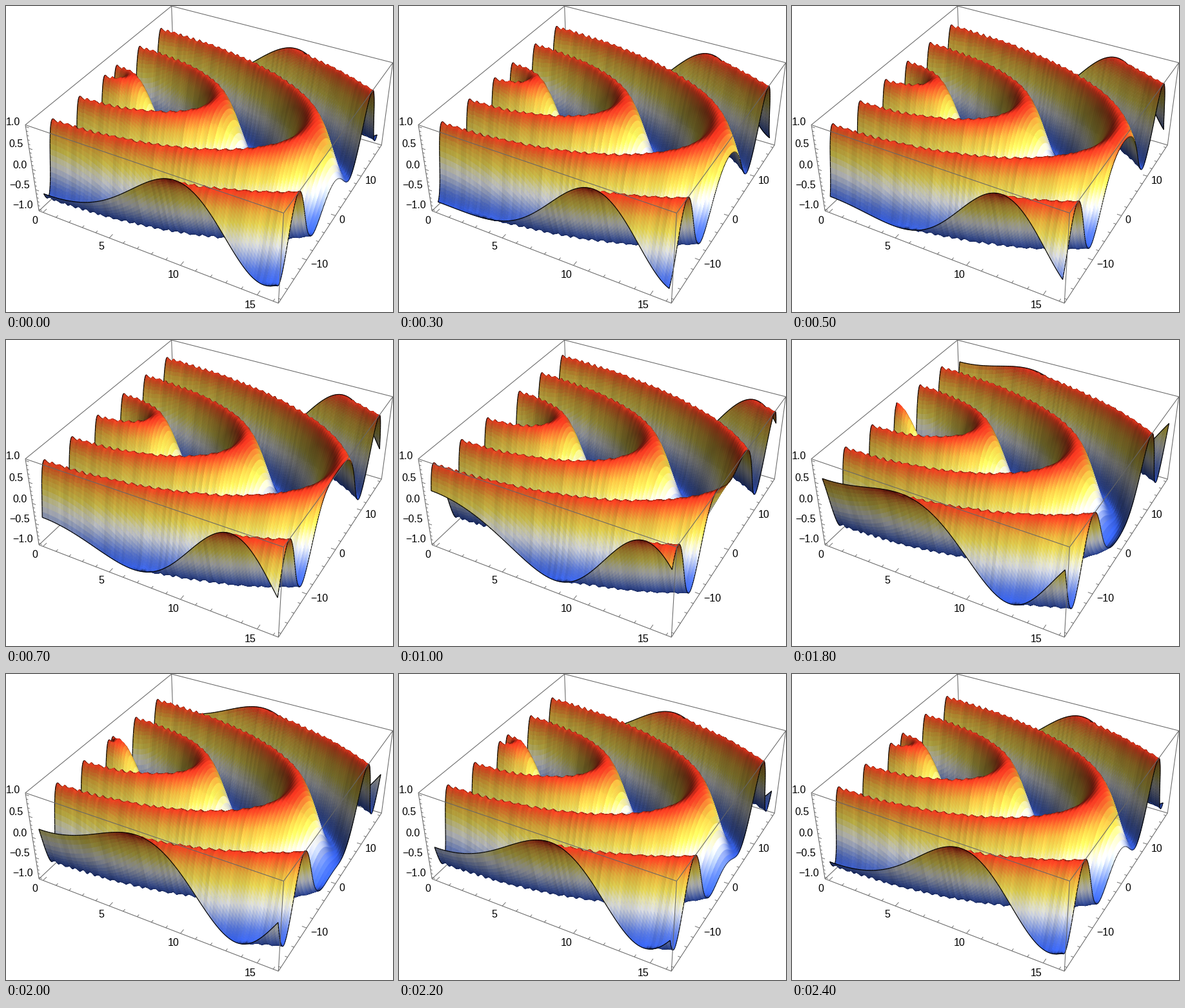
These frames come from a looping animation (600 px wide and 475 px high, 2500 ms). A matplotlib script:

```python
import numpy as np
import matplotlib.pyplot as plt
from matplotlib.animation import FuncAnimation
from matplotlib.collections import LineCollection, PolyCollection
from matplotlib.colors import LinearSegmentedColormap

W, H, DPI = 600, 475, 100
FRAMES, STEPS = 25, 24
NX, NY = 90, 240
X_MAX, Y_MAX = 16, 18
PAD = 1.04                       # axis box is slightly larger than the data
HALF = 0.5 / PAD
KX, KY = X_MAX * PAD, 2 * Y_MAX * PAD
AMP = 0.163
LIGHT = np.array([0.72, -0.32, 0.62])
GREY = "#666666"

# Camera looking at the centre of a 1 x 1 x 0.4 box
EYE = np.array([1.3, -2.4, 2.0])
DIST = np.linalg.norm(EYE)
FWD = -EYE / DIST
RIGHT = np.cross(FWD, [0, 0, 1])
RIGHT /= np.linalg.norm(RIGHT)
UP = np.cross(RIGHT, FWD)
ZOOM, CX, CY, SHEAR = 1369, 329.0, 201.5, 0.0055

HEAT = LinearSegmentedColormap.from_list("heat", [
    (0.00, (0.20, 0.38, 0.96)),
    (0.14, (0.38, 0.52, 0.96)),
    (0.30, (0.74, 0.80, 0.97)),
    (0.40, (0.95, 0.96, 0.98)),
    (0.50, (1.00, 0.99, 0.80)),
    (0.64, (1.00, 0.93, 0.36)),
    (0.78, (0.99, 0.76, 0.26)),
    (0.90, (0.99, 0.46, 0.18)),
    (0.96, (1.00, 0.27, 0.14)),
    (1.00, (1.00, 0.20, 0.12)),
])


def project(p):
    """Box coordinates (..., 3) to stage pixels (..., 2)."""
    p = np.asarray(p, float)
    depth = DIST + p @ FWD
    u, v = p @ RIGHT / depth, p @ UP / depth
    return np.stack([CX + ZOOM * u, CY - ZOOM * (v + SHEAR * u)], -1)


def segment(a, b):
    """Flat quads that draw as plain line segments."""
    return np.stack([a, b, b, a], -2)


def corners(g):
    return g[:-1, :-1], g[:-1, 1:], g[1:, 1:], g[1:, :-1]


def weave(cells, sides, back, front):
    """Back-to-front order: every row of cells is followed by its side lines."""
    rows = np.concatenate([cells, sides], 1)
    rest = rows[1:].reshape(-1, *rows.shape[2:])
    return np.concatenate([rows[0], back, rest, front])


# Surface grid, far row first
gx, gy = np.meshgrid(np.linspace(-HALF, HALF, NX + 1),
                     np.linspace(HALF, -HALF, NY + 1))
X, Y = (gx + HALF) * KX, gy * KY
R = np.hypot(X, Y) + 1e-9

# Notches along crests and troughs, and faint streaks on the walls
rng = np.random.default_rng(4)
tooth = np.where(np.arange(NX + 1) % 3, rng.uniform(0.2, 1, NX + 1), 0)
notch = (0.045 + 0.08 * tooth) * np.abs(Y) / R
notch *= 1 - (np.abs(gy) / HALF) ** 60
streak = 1 + rng.uniform(-0.06, 0.05, NX)

mid = lambda g: sum(corners(g)) / 4
mx, my, mX, mY = mid(gx), mid(gy), mid(X), mid(Y)
mR = np.hypot(mX, mY)


def shade(t, level):
    """Colour by height, lit from the right."""
    slope = AMP * np.cos(mR - t) / mR
    n = np.stack([-slope * mX * KX, -slope * mY * KY, np.ones_like(mR)], -1)
    n /= np.linalg.norm(n, axis=-1, keepdims=True)
    view = EYE - np.stack([mx, my, AMP * level], -1)
    under = (n * view).sum(-1) < 0
    n[under] *= -1
    glow = 0.37 + 0.75 * np.clip(n @ LIGHT, 0, None)
    glow = glow * streak * np.where(under, 0.88, 1)
    rgb = HEAT((level + 1) / 2)[..., :3] * glow[..., None]
    return np.clip(rgb, 0, 1)


def surface(t):
    s = np.sin(R - t)
    s = s - np.sign(s) * notch * np.clip((np.abs(s) - 0.4) / 0.6, 0, 1)
    p = project(np.stack([gx, gy, AMP * s], -1))
    sides = np.stack([segment(p[:-1, c], p[1:, c]) for c in (0, -1)], 1)
    back, front = (segment(p[r, :-1], p[r, 1:]) for r in (0, -1))
    verts = weave(np.stack(corners(p), 2), sides, back, front)
    black = np.zeros((NX, 3))
    colors = weave(shade(t, mid(s)), np.zeros((NY, 2, 3)), black, black)
    return verts, colors


fig = plt.figure(figsize=(W / DPI, H / DPI), dpi=DPI, facecolor="white")
ax = fig.add_axes([0, 0, 1, 1])
ax.set(xlim=(0, W), ylim=(H, 0))
ax.axis("off")


def add_lines(pairs, z, width=0.75):
    ax.add_collection(LineCollection([project(s) for s in pairs], colors=GREY,
                                     linewidths=width, zorder=z), autolim=False)


# Box edges
base = [(-0.5, -0.5), (0.5, -0.5), (0.5, 0.5), (-0.5, 0.5)]
top = [(x, y, 0.2) for x, y in base]
low = [(x, y, -0.2) for x, y in base]
add_lines([(top[2], top[3]), (top[3], top[0]), (low[2], low[3]),
           (low[3], low[0]), (low[3], top[3]), (low[2], top[2])], 1)
add_lines([(top[0], top[1]), (top[1], top[2]), (low[0], low[1]),
           (low[1], low[2]), (low[0], top[0]), (low[1], top[1])], 3)


def add_axis(values, place, inward, major, fmt, ha, out=(0, 0, 0), shift=(0, 0)):
    """Ticks along one edge, with a label at each multiple of major.

    Labels stand off by `out` in the box and by `shift` in pixels.
    """
    ticks = []
    for v in values:
        p = np.array(place(v))
        is_major = abs(v / major - round(v / major)) < 1e-6
        ticks.append((p, p + np.array(inward) * (1 if is_major else 0.55)))
        if is_major:
            x, y = project(p + np.array(out)) + shift
            text = format(round(v, 3) + 0.0, fmt).replace("-", "\u2212")
            ax.text(x, y + 5, text, ha=ha, va="baseline",
                    family="Liberation Sans", size=16 * 72 / DPI, zorder=4)
    add_lines(ticks, 3, 0.65)


add_axis(np.arange(0, 17), lambda v: (v / KX - HALF, -0.5, -0.2),
         (0, 0.022, 0), 5, ".0f", "center", out=(0, -0.05, 0))
add_axis(np.arange(-18, 19, 2), lambda v: (0.5, v / KY, -0.2),
         (-0.018, 0, 0), 10, ".0f", "left", shift=(6, 6.5))
add_axis(np.arange(-10, 11) / 10, lambda v: (-0.5, -0.5, 0.2 * v / PAD),
         (0.015, 0, 0), 0.5, ".1f", "right", shift=(-8.7, -6.8))

verts, colors = surface(0)
outline = np.full(NX, 0.85)
widths = weave(np.full((NY, NX), 0.45), np.full((NY, 2), 0.85), outline, outline)
sheet = PolyCollection(verts, facecolors=colors, edgecolors=colors,
                       linewidths=widths, joinstyle="round", zorder=2)
ax.add_collection(sheet, autolim=False)


def update(i):
    verts, colors = surface(2 * np.pi * i / STEPS)
    sheet.set_verts(verts)
    sheet.set_facecolor(colors)
    sheet.set_edgecolor(colors)
    return sheet,


anim = FuncAnimation(fig, update, frames=FRAMES, interval=100,
                     init_func=lambda: (sheet,), repeat=True, repeat_delay=0)
plt.show()
```
